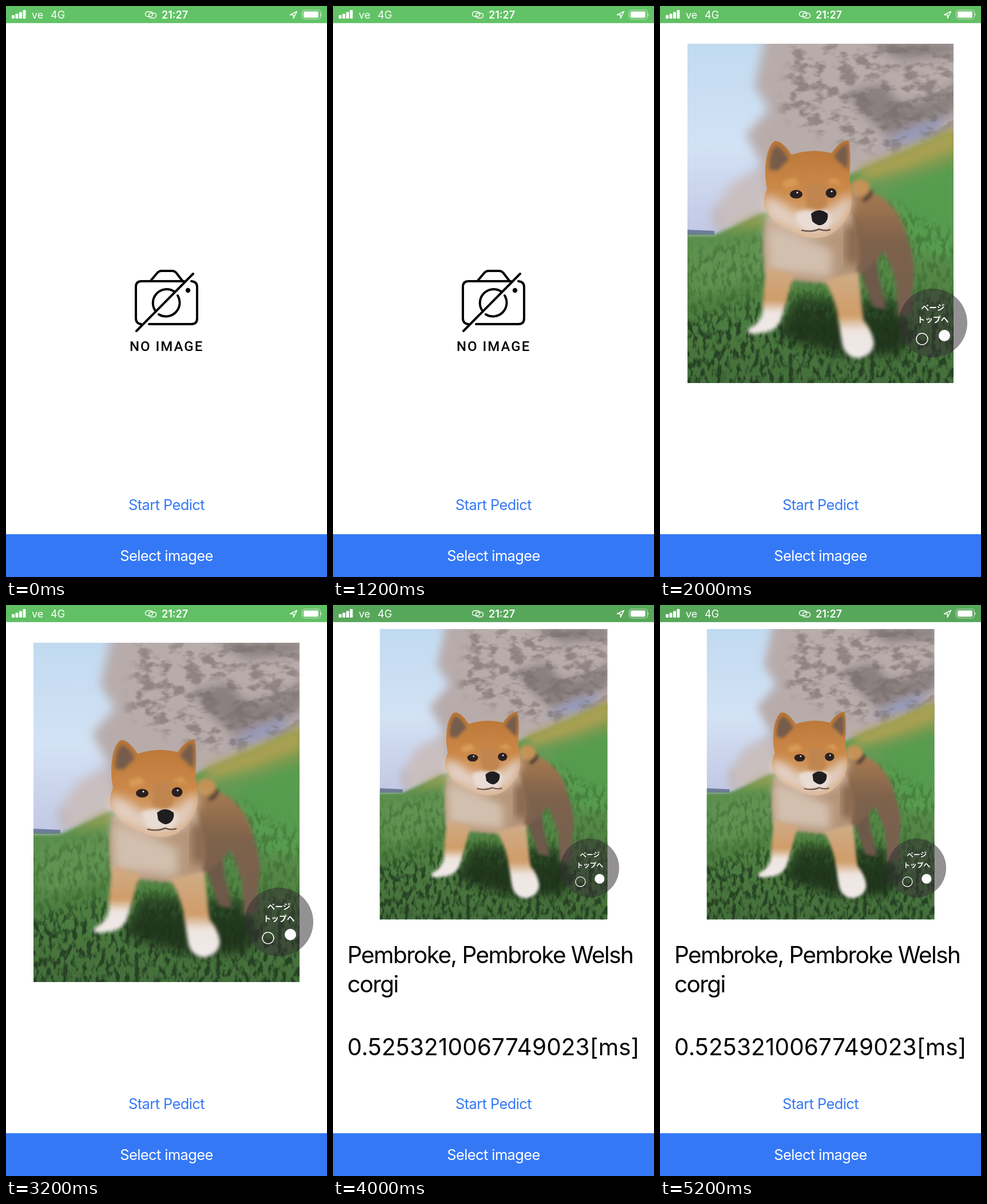
These frames come from a looping animation (561x998 px, 6 s). An HTML page without scripts:

```html
<!DOCTYPE html>
<html lang="en">
<head>
<meta charset="utf-8">
<title>Image classifier</title>
<style>
  html, body { margin: 0; width: 100%; height: 100%; overflow: hidden; background: #fff; }
  svg { display: block; width: 100%; height: 100%; }
  text { font-family: Inter, Roboto, sans-serif; font-optical-sizing: none; }
  .bar, .empty, .photo, .result { animation: 6s step-end infinite; }
  .bar { animation-name: bar; }
  .empty { animation-name: empty; }
  .photo { animation-name: photo; }
  .result { animation-name: result; }
  @keyframes bar { 0% { fill: #62c366; } 33.3333% { fill: #61bf64; } 66.6667%, 100% { fill: #57a75a; } }
  @keyframes empty { 0% { visibility: visible; } 33.3333%, 100% { visibility: hidden; } }
  @keyframes photo {
    0% { visibility: hidden; transform: none; }
    33.3333% { visibility: visible; transform: none; }
    66.6667%, 100% { visibility: visible; transform: translate(40.4px, -14.5px) scale(.856); }
  }
  @keyframes result { 0% { visibility: hidden; } 66.6667%, 100% { visibility: visible; } }
  .status text { font-size: 18px; fill: #fff; }
  .line { fill: none; stroke-linecap: round; stroke-linejoin: round; }
  .action { font-size: 25.4px; letter-spacing: -.55px; text-anchor: middle; }
  .answer { font-size: 40.5px; }
  .to-top text { font: 700 13.7px "Noto Sans CJK JP", "Noto Sans CJK", sans-serif; fill: #fff; text-anchor: middle; }
</style>
</head>
<body>
<svg viewBox="0 0 561 998" preserveAspectRatio="none">
  <defs>
    <linearGradient id="sky" x2="0" y2="1">
      <stop offset="0" stop-color="#c1daf0"/>
      <stop offset=".3" stop-color="#d3e2f5"/>
      <stop offset=".55" stop-color="#c3c9e4"/>
    </linearGradient>
    <linearGradient id="grass" x2="0" y2="1">
      <stop offset="0" stop-color="#8a9a49"/>
      <stop offset=".25" stop-color="#639a55"/>
      <stop offset=".6" stop-color="#528544"/>
      <stop offset="1" stop-color="#426c39"/>
    </linearGradient>
    <linearGradient id="coat" x2="0" y2="1">
      <stop offset="0" stop-color="#a87a50"/>
      <stop offset=".4" stop-color="#7e624c"/>
      <stop offset="1" stop-color="#74604f"/>
    </linearGradient>
    <linearGradient id="leg" x2="0" y2="1">
      <stop offset="0" stop-color="#d0ac88"/>
      <stop offset=".5" stop-color="#cf9d68"/>
      <stop offset=".68" stop-color="#eee5e0"/>
      <stop offset="1" stop-color="#f0e9e8"/>
    </linearGradient>
    <linearGradient id="face" x2="0" y2="1">
      <stop offset="0" stop-color="#b87535"/>
      <stop offset=".5" stop-color="#cb8848"/>
      <stop offset="1" stop-color="#d9b38d"/>
    </linearGradient>
    <filter id="soft" x="-20%" y="-20%" width="140%" height="140%"><feGaussianBlur stdDeviation="9"/></filter>
    <filter id="fur" x="-20%" y="-20%" width="140%" height="140%"><feGaussianBlur stdDeviation="3"/></filter>
    <!-- Keep a blurred shape only where the noise is strong. -->
    <filter id="petals">
      <feTurbulence type="fractalNoise" baseFrequency=".035 .06" numOctaves="3" seed="4"/>
      <feColorMatrix values="0 0 0 0 0  0 0 0 0 0  0 0 0 0 0  5 0 0 0 -2.3" result="noise"/>
      <feGaussianBlur in="SourceGraphic" stdDeviation="9"/>
      <feComposite operator="in" in2="noise"/>
    </filter>
    <filter id="blades">
      <feTurbulence type="fractalNoise" baseFrequency=".12 .06" numOctaves="3" seed="9"/>
      <feColorMatrix values="0 0 0 0 0  0 0 0 0 0  0 0 0 0 0  5 0 0 0 -2.3" result="noise"/>
      <feGaussianBlur in="SourceGraphic" stdDeviation="9"/>
      <feComposite operator="in" in2="noise"/>
    </filter>
    <clipPath id="frame"><rect x="48" y="66" width="465" height="593"/></clipPath>
  </defs>

  <rect width="561" height="998" fill="#fff"/>

  <g class="empty">
    <g class="line" stroke="#000" stroke-width="4">
      <path d="M311 481H237q-10 0-10 10V546q0 9 9 10M250 556H324q10 0 10-10V491q0-9-10-10"/>
      <path d="M253 480L264 467q3-4 8-4H290q5 0 8 4L308 480M228 568L327 468"/>
      <path d="M262 534A24 24 0 0 1 294 499M300 506A24 24 0 0 1 267 539"/>
    </g>
    <circle cx="318" cy="497" r="4.2"/>
    <text x="216" y="603" style="font: 500 24px Roboto, sans-serif; letter-spacing: 2px">NO IMAGE</text>
  </g>

  <g class="photo">
    <g clip-path="url(#frame)">
      <rect x="48" y="66" width="465" height="593" fill="url(#sky)"/>
      <g filter="url(#soft)">
        <path fill="#b8acab" d="M185 50H530V270L400 290L230 330L100 400L92 360L125 310L180 280L150 225L190 180L165 140Z"/>
        <path fill="#c9bfc1" d="M100 345L130 305L185 285V375L105 395Z"/>
        <path fill="#8a8080" d="M325 150L390 135L420 170L480 160L520 130V185L440 210L400 230L350 185ZM360 62H520V85L420 95Z"/>
        <path fill="#959abd" d="M435 215L500 195L480 235L380 250Z"/>
      </g>
      <path fill="#766c6b" opacity=".6" filter="url(#petals)" d="M230 66H513V215L400 260L300 235L210 190Z"/>
      <path fill="#6f7ba0" d="M48 391L95 393V400H48Z"/>
      <path fill="url(#grass)" filter="url(#fur)" d="M40 400H95L180 362L340 290L420 258L525 212V670H40Z"/>
      <g filter="url(#soft)">
        <path fill="#a9a052" d="M345 285L430 250L520 210V250L430 285L360 305ZM110 395L185 360V380Z"/>
        <path fill="#579c50" d="M400 320L520 275V440L450 430Z"/>
        <path fill="#619351" d="M50 420L180 400V470L60 510Z"/>
        <path fill="#23371f" d="M205 570L240 510L310 515L410 515L440 570L420 610L320 610L240 590Z"/>
      </g>
      <path fill="#1d331a" opacity=".75" filter="url(#blades)" d="M30 545L190 505H530V680H30Z"/>
      <path fill="#39652f" opacity=".5" filter="url(#blades)" d="M40 430L180 400L400 340L520 400V550H40Z"/>

      <g filter="url(#fur)">
        <path fill="#6d584a" d="M345 435L382 415Q376 460 388 495L396 530L372 526L356 480Z"/>
        <path fill="url(#coat)" d="M320 335Q365 310 400 345Q426 370 433 410Q448 445 442 485L440 538L416 542L413 485Q405 452 391 428Q378 450 347 470L300 480Z"/>
        <path fill="#4f4034" d="M352 340Q362 348 373 327L368 318Z"/>
        <ellipse cx="350" cy="318" rx="17" ry="15" fill="#c49257"/>
      </g>
      <path fill="#b5967a" filter="url(#fur)" d="M185 370Q177 440 187 468Q260 490 340 482Q355 420 333 360Z"/>
      <path fill="#84654c" filter="url(#soft)" d="M325 385L350 380V455L325 450Z"/>
      <path fill="#d3bfae" filter="url(#soft)" d="M184 380L230 395L300 425L300 475L240 468L188 465Z"/>
      <g filter="url(#fur)">
        <path fill="url(#leg)" d="M186 455Q180 500 179 538Q171 557 154 565Q150 574 165 573L187 570Q204 565 211 550L222 514Q227 490 236 470Z"/>
        <path fill="url(#leg)" d="M287 478Q307 512 312 550L318 590Q323 614 347 616Q373 610 374 589Q371 567 356 550Q351 510 347 465Z"/>
      </g>

      <path fill="url(#face)" d="M184 298Q183 252 199 237Q211 232 230 260Q264 248 300 257Q315 235 329 235Q334 250 331 300Q339 335 332 360Q318 390 293 402Q263 412 233 395Q196 382 182 350Q180 333 187 320Z"/>
      <path fill="#765b4c" filter="url(#fur)" d="M191 286Q190 254 203 244Q216 249 225 268L205 288ZM304 264Q317 242 327 242Q330 260 327 286Z"/>
      <path fill="#e2cfc2" filter="url(#soft)" d="M178 332Q210 335 232 360L260 365Q285 352 302 356Q318 333 337 330Q336 358 315 382Q286 402 254 399Q222 390 187 371Z"/>
      <path fill="#e9dcd4" filter="url(#fur)" d="M237 362Q255 354 266 358H292L300 370Q299 385 287 391L255 392Q238 382 237 362Z"/>
      <path fill="#c08550" filter="url(#fur)" d="M255 310H288L293 350L278 357L256 352Z"/>
      <path fill="#d99b59" filter="url(#fur)" d="M214 307L235 300L243 312L218 319ZM290 308L306 300L318 313Z"/>
      <ellipse cx="238" cy="329" rx="11" ry="7.5" fill="#2a2020"/>
      <ellipse cx="299" cy="327" rx="9.5" ry="8.500" fill="#2a2020"/>
      <path fill="#201d21" d="M264 363Q278 351 293 363Q295 376 284 382Q276 386 266 376Z"/>
      <path class="line" stroke="#70564a" stroke-width="2.5" d="M248 392Q265 396 278 390Q288 394 297 391"/>
      <g fill="#fff"><circle cx="240" cy="326" r="1.5"/><circle cx="300" cy="324" r="1.5"/></g>
    </g>
    <g class="to-top">
      <circle cx="477" cy="554" r="60" fill="#322d32" fill-opacity=".52"/>
      <text x="477" y="532">ページ</text>
      <text x="477" y="553">トップへ</text>
      <circle cx="458" cy="582" r="10" fill="none" stroke="#fff" stroke-width="1.5"/>
      <circle cx="497" cy="576" r="10" fill="#fff"/>
    </g>
  </g>

  <g class="result">
    <g letter-spacing="-1.6">
      <text class="answer" x="25" y="625.5">Pembroke, Pembroke Welsh</text>
      <text class="answer" x="25" y="677">corgi</text>
    </g>
    <text class="answer" x="25" y="787" letter-spacing=".12">0.5253210067749023[ms]</text>
  </g>

  <text class="action" x="280.5" y="881" fill="#3478f6">Start Pedict</text>
  <rect y="923.2" width="561" height="74.8" fill="#3478f6"/>
  <text class="action" x="280.5" y="970" fill="#fff">Select imagee</text>

  <g class="status">
    <rect class="bar" width="561" height="29.9" fill="#62c366"/>
    <g fill="#fff">
      <rect x="10" y="16" width="5" height="6" rx="1"/>
      <rect x="16.5" y="13.5" width="5" height="8.5" rx="1"/>
      <rect x="23" y="10.5" width="5" height="11.5" rx="1"/>
      <rect x="29.5" y="7" width="5" height="15" rx="1"/>
      <rect x="520" y="9.5" width="26" height="11" rx="2.5"/>
      <path d="M550.5 12.5q2 2.5 0 5Z"/>
    </g>
    <text x="45" y="22">ve</text>
    <text x="78" y="22">4G</text>
    <text x="295" y="22" text-anchor="middle" font-weight="600">21:27</text>
    <g class="line" stroke="#fff" stroke-width="1.5">
      <rect x="243.5" y="10" width="13" height="8.5" rx="4.25"/>
      <rect x="249.5" y="12.5" width="13" height="8.5" rx="4.25"/>
      <path d="M496.5 15.5L508.5 9.5L502.5 21.5V15.5Z"/>
      <rect x="517.5" y="7" width="32" height="16" rx="4.5" stroke-width="1.2" opacity=".6"/>
    </g>
  </g>
</svg>
</body>
</html>
```
